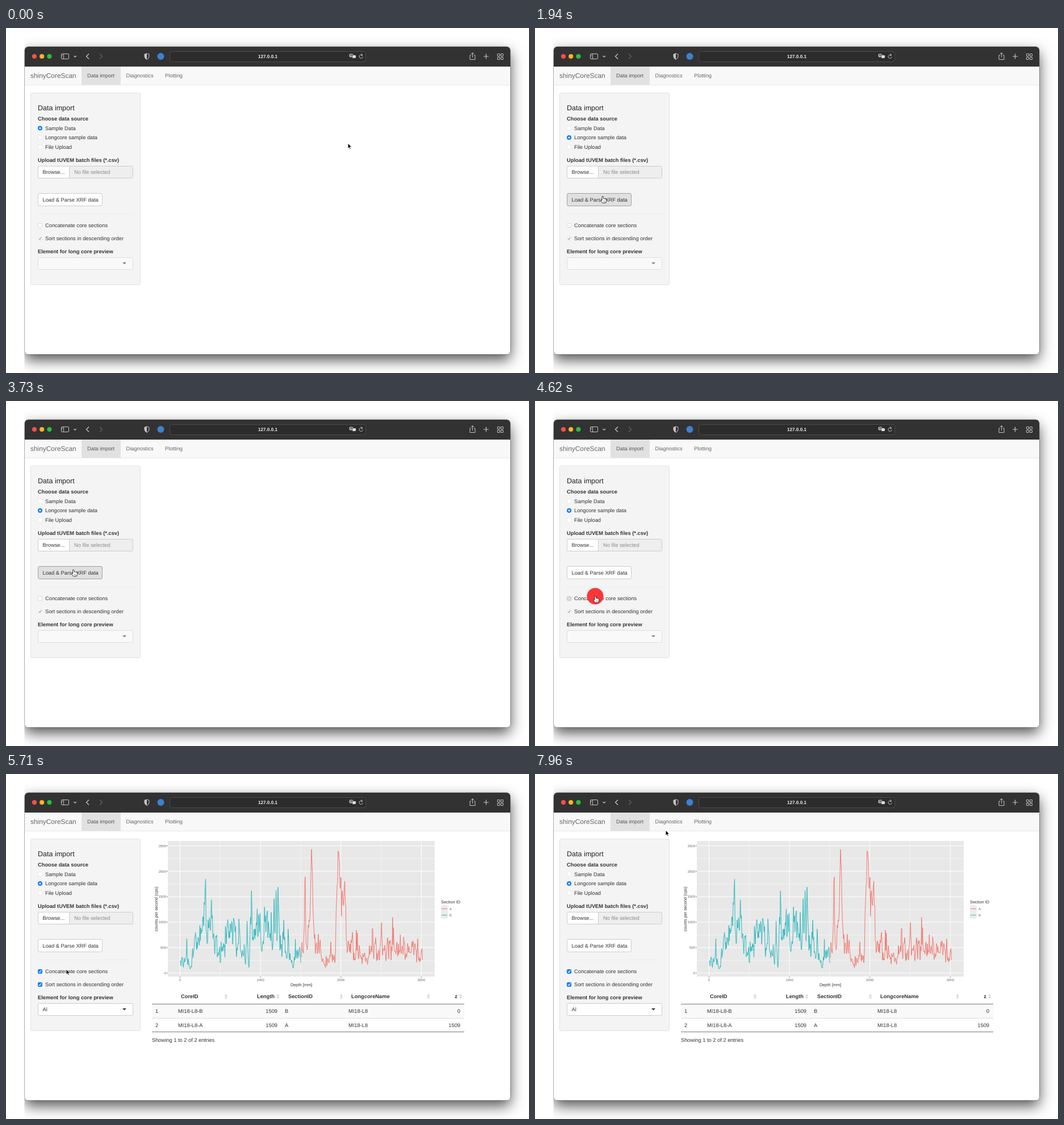
An HTML page with a canvas that plays this animation: 921 px wide and 608 px high, repeating every 8 s.

```html
<!DOCTYPE html>
<html lang="en">
<head>
<meta charset="utf-8">
<title>Core data import</title>
<style>
html, body { margin: 0; width: 100%; height: 100%; overflow: hidden; background: #fff; }
canvas { display: block; }
</style>
</head>
<body>
<canvas id="stage" width="921" height="608"></canvas>
<script>
const c = document.getElementById('stage').getContext('2d');
const LOOP = 8000, FONT = '"Liberation Sans", Arial, sans-serif', BLUE = '#147cf5';
c.textRendering = 'geometricPrecision';

// ---- helpers ----
function text(s, x, midY, { size = 9.3, bold = false, color = '#333', align = 'left' } = {}) {
  c.font = `${bold ? 'bold ' : ''}${size}px ${FONT}`;
  c.fillStyle = color;
  c.textAlign = align;
  c.fillText(s, x, midY + size * 0.35);
}
function rect(x, y, w, h, fill) {
  c.fillStyle = fill;
  c.fillRect(x, y, w, h);
}
function round(x, y, w, h, r, fill, stroke) {
  c.beginPath();
  c.roundRect(x, y, w, h, r);
  if (fill) { c.fillStyle = fill; c.fill(); }
  if (stroke) { c.strokeStyle = stroke; c.lineWidth = 1; c.stroke(); }
}
const box = (x, y, w, h, r, fill, stroke) => round(x + .5, y + .5, w - 1, h - 1, r, fill, stroke);
function dot(x, y, r, fill) {
  c.beginPath();
  c.arc(x, y, r, 0, 7);
  c.fillStyle = fill;
  c.fill();
}
function path(d, stroke, width = 1, fill) {
  const p = new Path2D(d);
  if (fill) { c.fillStyle = fill; c.fill(p); }
  if (stroke) { c.strokeStyle = stroke; c.lineWidth = width; c.stroke(p); }
}
const ramp = (t, a, b) => Math.max(0, Math.min(1, (t - a) / (b - a)));
const between = (t, a, b) => t >= a && t < b;

// ---- pointer: each move eases along a curve from where the last one ended ----
const home = [602, 203];
const moves = [
  { span: [270, 1050], bend: [370, 252], to: [131, 197] },
  { span: [1490, 1940], bend: [140, 250], to: [119, 297] },
  { span: [3700, 4150], bend: [108, 320], to: [106, 344] },
  { span: [5900, 6680], bend: [440, 205], to: [582, 289] },
  { span: [6730, 6920], bend: [545, 303], to: [514, 300] },
  { span: [6920, 7140], bend: [645, 268], to: [568, 303] },
  { span: [7380, 7960], bend: [340, 270], to: [230, 99] }
];
function pointer(t) {
  const i = moves.findLastIndex(m => t >= m.span[0]);
  if (i < 0) return home;
  const { span, bend, to } = moves[i], from = i ? moves[i - 1].to : home;
  const u = ramp(t, ...span), k = u * u * (3 - 2 * u), n = 1 - k;
  return [0, 1].map(a => n * n * from[a] + 2 * n * k * bend[a] + k * k * to[a]);
}
const overButton = (x, y) => between(x, 56, 170) && between(y, 292, 314);
const overLabel = (x, y) => between(x, 56, 175) && [177, 193, 210, 348].some(m => Math.abs(y - m) < 7);

function drawPointer(x, y, hand) {
  c.save();
  c.translate(x, y);
  c.lineJoin = 'round';
  if (hand) {
    path('M-1 0Q0-1 1 0L2 4Q3 3 4 4Q5 3.6 5.6 4.8Q7 4.5 7 6L6 11L0 11.5L-3 7Q-3 5.5-1 6.5Z', '#222', .9, '#fff');
    path('M2 7V10M4 7V10', '#555', .6);
  } else {
    path('M0 0V9.6L2.2 7.6L3.8 11L5.4 10.3L3.8 7H6.8Z', '#fff', 1, '#000');
  }
  c.restore();
}

// ---- window ----
function drawWindow() {
  rect(0, 0, 921, 608, '#fff');
  c.save();
  c.beginPath();
  c.rect(32.5, 0, 889, 608);
  c.clip();
  c.shadowColor = 'rgba(0,0,0,.68)';
  c.shadowBlur = 25;
  c.shadowOffsetY = 10;
  round(33, 33, 855, 542, 6, '#fff');
  c.restore();
  round(33, 33, 855, 542, 6, null, 'rgba(0,0,0,.4)');
  round(33, 33, 855, 542, 6, '#fff');

  round(33, 33, 855, 35, [6, 6, 0, 0], '#323232');
  ['#fc4f4a', '#fdb32b', '#28c13c'].forEach((f, i) => dot(50 + i * 13.2, 50, 4.1, f));
  const icon = '#c4c4c4';
  box(97, 45, 14, 10, 1.5, null, icon);
  path('M101.5 45V55M98.5 47.5H100M98.5 49.5H100', icon, .9);
  path('M119.5 49L121.7 51.2L124 49', icon, 1.2);
  path('M146 45.5L141.5 50L146 54.5', icon, 1.3);
  path('M165 45.5L169.5 50L165 54.5', '#606060', 1.3);
  path('M248 45L252 46.2V50Q252 53.5 248 55.5Q244 53.5 244 50V46.2Z', icon);
  path('M248 45L244 46.2V50Q244 53.5 248 55.5Z', null, 1, icon);
  dot(272.5, 50, 6, '#3b82d0');
  box(288, 41, 346, 19, 4, '#2c2c2c', '#4c4c4c');
  text('127.0.0.1', 461, 50.5, { size: 8.2, bold: true, color: '#f0f0f0', align: 'center' });
  box(604, 45, 8, 7, 2, '#bbb');
  box(609, 47, 8, 7, 2, '#ddd', '#323232');
  path('M606 47.5H610M608 46.5L606.5 50', '#333', .8);
  path('M627.5 48A3.2 3.2 0 1 0 628.4 50.7M625.5 45L628 47.8L625 49', icon, 1);
  path('M819 48H817V55.5H826V48H824M821.5 52V43.5M819 46L821.5 43.5L824 46', icon);
  path('M841 50H850M845.5 45.5V54.5', icon, 1.2);
  for (const x of [865, 871]) for (const y of [45, 51]) box(x, y, 5, 5, .5, null, icon);

  rect(33, 68, 855, 33, '#f8f8f8');
  rect(33, 100, 855, 1, '#e7e7e7');
  rect(133, 68, 69, 32, '#e1e1e1');
  text('shinyCoreScan', 43, 84, { size: 11.9, color: '#666' });
  text('Data import', 143, 84, { color: '#555' });
  text('Diagnostics', 211.5, 84, { color: '#666' });
  text('Plotting', 280, 84, { color: '#666' });
}

// ---- sidebar ----
function radio(y, on, label) {
  dot(60, y, 4, on ? BLUE : '#ddd');
  dot(60, y, on ? 1.6 : 3.5, '#fff');
  text(label, 69, y);
}
function checkbox(y, label, fill, border, tick) {
  box(56, y - 4, 8, 8, 1.5, fill, border);
  if (tick) path(`M58 ${y}L59.6 ${y + 1.9}L62.2 ${y - 2.2}`, tick, 1.1);
  text(label, 69, y);
}
function drawSidebar(t, hoverButton) {
  const heading = (s, y) => text(s, 56, y, { bold: true });
  box(43, 114, 194, 339, 2, '#f4f4f4', '#e2e2e2');
  text('Data import', 56, 140.5, { size: 12.5, color: '#222' });
  heading('Choose data source', 160);
  const longcore = t >= 1400;
  radio(176.5, !longcore, 'Sample Data');
  radio(193, longcore, 'Longcore sample data');
  radio(209.5, false, 'File Upload');

  heading('Upload tUVEM batch files (*.csv)', 232.5);
  box(56, 243, 168, 22, 2, '#eee', '#ccc');
  round(56.5, 243.5, 55, 21, [2, 0, 0, 2], '#fff', '#ccc');
  text('Browse...', 64.5, 254);
  text('No file selected', 120, 254, { color: '#8a8a8a' });

  box(56, 291, 114, 23, 2.5, hoverButton ? '#e0e0e0' : '#fff', hoverButton ? '#a0a0a0' : '#ccc');
  text('Load & Parse XRF data', 64.5, 302.5);
  rect(56, 327, 168, 1, '#ededed');

  const pressed = t >= 4620, checked = t >= 4720, enabled = t >= 4800;
  const concat = 'Concatenate core sections', sort = 'Sort sections in descending order';
  if (checked) checkbox(348, concat, BLUE, BLUE, '#fff');
  else checkbox(348, concat, pressed ? '#dcdcdc' : '#fff', pressed ? '#c4c4c4' : '#ddd');
  if (enabled) checkbox(371, sort, BLUE, BLUE, '#fff');
  else checkbox(371, sort, '#f8f8f8', '#ececec', '#999');

  heading('Element for long core preview', 394);
  box(56, 404, 168, 22, 2, enabled ? '#fff' : '#f9f9f9', enabled ? '#ccc' : '#dedede');
  path('M205 413H212L208.5 416.6Z', null, 1, enabled ? '#333' : '#858585');
  if (enabled) text('Al', 64.5, 415);
}

// ---- table ----
function drawTable() {
  [['CoreID', 308], ['Length', 473, 'right'], ['SectionID', 497], ['LongcoreName', 608], ['z', 795, 'right']]
    .forEach(([s, x, align]) => text(s, x, 392, { bold: true, align }));
  for (const x of [387.5, 478.5, 590.5, 744, 800.5])
    path(`M${x - 2.7} 391.3H${x + 2.7}L${x} 388ZM${x - 2.7} 392.8H${x + 2.7}L${x} 396.1Z`, null, 1, '#cfcfcf');
  rect(257, 406, 550, 24, '#f9f9f9');
  rect(257, 405, 550, 1, '#777');
  rect(257, 430, 550, 1, '#ddd');
  rect(257, 454, 550, 1, '#777');
  [['1', 'B', '0'], ['2', 'A', '1509']].forEach(([n, id, z], i) => {
    const y = 418 + i * 24.3;
    text(n, 263, y);
    text('MI18-L8-' + id, 303, y);
    text('1509', 478, y, { align: 'right' });
    text(id, 491, y);
    text('MI18-L8', 603, y);
    text(z, 800, y, { align: 'right' });
  });
  text('Showing 1 to 2 of 2 entries', 257, 468.5);
}

// ---- plot: a trend through [depth, counts] points, roughened by seeded noise ----
const TEAL = '#1eb4ba', RED = '#f26c63';
const px = depth => 306.5 + depth * .1416, py = counts => 350.8 - counts * .0897;
function trend(points, depth) {
  const i = Math.max(1, points.findIndex(p => p[0] >= depth));
  const [d0, v0] = points[i - 1], [d1, v1] = points[i];
  return v0 + (v1 - v0) * ramp(depth, d0, d1);
}
function trace(points, seed) {
  const rnd = () => (seed = seed * 16807 % 2147483647) / 2147483647;
  const p = new Path2D(), first = points[0][0], last = points[points.length - 1][0];
  let noise = 0;
  for (let d = first; d <= last; d += 6) {
    noise = .55 * noise + .9 * (rnd() + rnd() + rnd() - 1.5);
    const level = trend(points, d);
    p.lineTo(px(d), py(Math.max(60, level * Math.exp(noise * (1 - level / 2500)))));
  }
  return p;
}
const traces = [
  [TEAL, trace([[0, 180], [120, 250], [240, 950], [400, 900], [500, 400], [720, 650], [860, 300],
    [890, 1000], [1200, 950], [1340, 450], [1430, 180], [1509, 500]], 7100)],
  [RED, trace([[1509, 450], [1610, 650], [1640, 2300], [1670, 600], [1690, 270], [1930, 270],
    [1968, 2480], [1990, 1700], [2060, 1200], [2075, 450], [2160, 600], [2290, 380],
    [2450, 520], [2700, 550], [3015, 430]], 13700)]
];

function drawPlot() {
  const tick = { size: 6, color: '#666' };
  rect(285, 118, 470, 239, '#e8e8e8');
  for (let d = 0; d <= 3000; d += 500)
    path(`M${px(d)} 118V357`, '#fff', d % 1000 ? .5 : 1);
  for (let v = 0; v <= 2500; v += 250)
    path(`M285 ${py(v)}H755`, '#fff', v % 500 ? .5 : 1);
  for (let v = 0; v <= 2500; v += 500) {
    path(`M283 ${py(v)}H285`, '#555', .8);
    text(v, 282, py(v), { ...tick, align: 'right' });
  }
  for (let d = 0; d <= 3000; d += 1000) {
    path(`M${px(d)} 357V359`, '#555', .8);
    text(d, px(d), 363, { ...tick, align: 'center' });
  }
  c.lineJoin = 'round';
  c.lineWidth = .9;
  for (const [color, p] of traces) {
    c.strokeStyle = color;
    c.stroke(p);
  }
  text('Depth [mm]', 520, 371, { size: 7.4, align: 'center' });
  c.save();
  c.translate(264, 238);
  c.rotate(-Math.PI / 2);
  text('counts per second (cps)', 0, 0, { size: 7.4, align: 'center' });
  c.restore();
  text('Section ID', 766, 225, { size: 7.4 });
  [['A', RED], ['B', TEAL]].forEach(([s, color], i) => {
    const y = 237.5 + i * 11.3;
    rect(766, y - 5.6, 12, 11.3, '#ebebeb');
    path(`M767 ${y}H777`, color, .9);
    text(s, 781, y, tick);
  });
}

// ---- progress notice ----
function drawNotice(t) {
  c.globalAlpha = 1 - ramp(t, 3290, 3480);
  const done = .42 * ramp(t, 2680, 2980) + .58 * ramp(t, 3110, 3290);
  box(725, 521, 161, 52, 2, '#ebebeb', '#d0d0d0');
  box(733, 529, 136, 7, 1, '#f5f5f5');
  rect(733, 529, 136 * done, 7, '#437fbf');
  path('M873.2 529.8L877.8 534.4M877.8 529.8L873.2 534.4', '#444', 1.4);
  text('Parsing XRF files', 733, 546, { size: 8.45, bold: true });
  text('This may take a', 805, 546, { size: 7.3 });
  text('moment...', 733, 559, { size: 7.3 });
  c.globalAlpha = 1;
}

// ---- timeline ----
const clicks = [1320, 2450, 4620];
const waits = [[5080, 5440], [5710, 5780]];

function draw(t) {
  const [x, y] = pointer(t), onButton = overButton(x, y);
  const waiting = waits.some(w => between(t, ...w));
  drawWindow();
  drawSidebar(t, onButton);
  if (t >= 5000) drawTable();
  if (t >= 5710) drawPlot();
  if (between(t, 2600, 3490)) drawNotice(t);
  if (clicks.some(a => between(t, a, a + 150))) dot(x, y, 14.6, '#fb3638');
  drawPointer(x, y, (onButton || overLabel(x, y)) && !waiting);
}

const start = performance.now();
function frame() {
  draw((performance.now() - start) % LOOP);
  requestAnimationFrame(frame);
}
frame();
</script>
</body>
</html>
```
